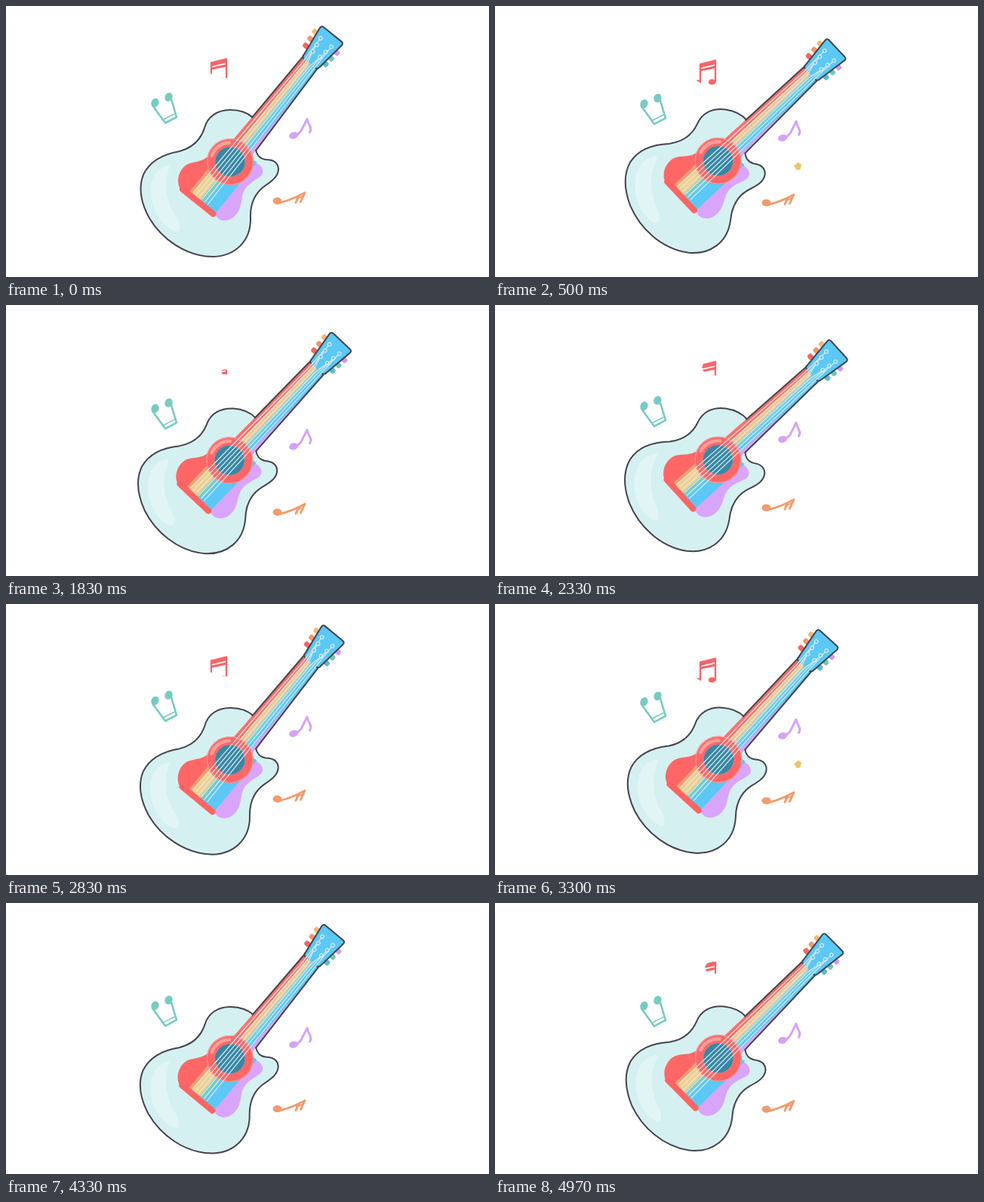
These frames come from a looping animation (640 px wide and 360 px high, 5000 ms). An HTML page:

```html
<!DOCTYPE html>
<html lang="en">
<head>
<meta charset="utf-8">
<title>Guitar and notes</title>
<style>
html, body { margin: 0; width: 100%; height: 100%; overflow: hidden; background: #fff; }
svg { display: block; width: 100vw; height: 100vh; }
.line { fill: none; stroke-linecap: round; stroke-linejoin: round; }
.edge { stroke: #45434d; stroke-width: 2; stroke-linejoin: round; stroke-linecap: round; }
.solid { stroke: none; }
</style>
</head>
<body>
<svg viewBox="0 0 640 360">
  <defs><clipPath id="reveal"><ellipse id="window" cx="290" cy="84"/></clipPath></defs>

  <g id="guitar">
    <path class="edge" fill="#d5f0f1" d="M327 148C318 140 307 138 297 138C280 138 267 147 263 162C258 178 248 188 230 193C207 197 190 207 182 224C175 242 179 262 190 282C206 309 238 333 275 333C303 332 324 313 324 283C323 263 329 249 343 239C355 231 361 225 361 216C360 207 354 204 344 204C336 203 332 197 331 191"/>
    <path fill="#e2f5f5" d="M214 212C194 218 188 240 194 263C201 285 215 298 228 300C233 296 230 285 222 275C212 255 209 235 217 212Z"/>
    <g transform="translate(297 207) rotate(39)">
      <path fill="#d9a5fb" d="M27-20C36-24 46-18 43-9C40 2 36 10 39 20C42 30 52 38 50 53C48 66 36 72 28 66Z"/>
      <path fill="#ff6767" d="M-20-15L-14 66L-28 70C-40 66-47 50-42 38C-37 28-28 24-27 10Z"/>
      <path fill="#f2cf8c" d="M-15 0H1V66H-15Z"/>
      <path fill="#f5a06f" d="M-17 0H-12V66H-17Z"/>
      <path fill="#79cbc4" d="M1 0H8V66H1Z"/>
      <path fill="#5bc8f5" d="M8-20L28-22V67H8Z"/>
      <path class="line" stroke="#ff6464" stroke-width="8" d="M-26 68H26"/>
      <g id="neck"></g>
      <path class="line edge" d="M-13-168L-14.5-64M12-168L17-33"/>
      <circle r="31" fill="#ff6767"/>
      <circle r="30.3" fill="none" stroke="#f79a95" stroke-width="1.2"/>
      <path class="line" stroke="#ff9e9a" stroke-width="4.5" d="M-24 9A25.5 25.5 0 0 1-17-19"/>
      <circle r="20" fill="#3787a5" stroke="#c77c85" stroke-width="1"/>
      <g id="pegs"></g>
      <path class="edge" fill="#5bc8f5" d="M-11-168Q-14-169-13.5-172L-19.5-213Q-20-217-16-217H14Q18-217 17.5-213L13-172Q13-169 10-168"/>
      <g id="strings" class="line" stroke="#dcebed"></g>
    </g>
  </g>

  <g id="teal" class="line" stroke="#78cbc3" stroke-width="2.6">
    <g class="solid" fill="#78cbc3">
      <ellipse cx="197.5" cy="128.5" rx="5" ry="6" transform="rotate(25 197.5 128.5)"/>
      <ellipse cx="215.5" cy="121" rx="5" ry="6" transform="rotate(25 215.5 121)"/>
    </g>
    <path d="M194 132L211 155.5L226 147.5L219 124"/>
    <path stroke-width="1.6" d="M208 151L223 143.5"/>
  </g>

  <g id="purple" class="line" stroke="#d5a2f8" stroke-width="2.9">
    <ellipse class="solid" cx="381" cy="172" rx="6" ry="4.5" fill="#d5a2f8" transform="rotate(-15 381 172)"/>
    <path d="M384 173L391 166L399 150Q400 155 403 160Q405 164 402.5 168"/>
  </g>

  <g id="orange" class="line" stroke="#f29b6c" stroke-width="2.8">
    <ellipse class="solid" cx="359.5" cy="259" rx="6" ry="4.7" fill="#f29b6c"/>
    <path d="M361 262Q380 257 396 248L390.5 260M388 252.5L384 261"/>
    <path stroke-width="1.8" d="M385 256L393 253"/>
  </g>

  <g id="red"><g clip-path="url(#reveal)" class="line" stroke="#f8656a" stroke-width="2.3">
    <g class="solid" fill="#f8656a">
      <ellipse cx="269" cy="106" rx="4.3" ry="3.6"/>
      <ellipse cx="287.5" cy="105" rx="4.5" ry="3.6"/>
      <path d="M271 80.5L293 75V81L271 86.5Z"/>
      <path d="M271 88L293 83V86.5L271 91Z"/>
    </g>
    <path d="M272 82V106M292 77V105"/>
  </g></g>
  <path id="yellow" fill="#edc66b" d="M-6-1L1-6L6-3L4 5L-1 6Z"/>
</svg>
<script>
const LOOP = 5000, FPS = 24, SWING = 1515, BOB = 2800;
const $ = id => document.getElementById(id);

function add(parent, tag, attrs) {
  const el = document.createElementNS("http://www.w3.org/2000/svg", tag);
  for (const k in attrs) el.setAttribute(k, attrs[k]);
  $(parent).append(el);
}

// Neck stripes: colour, then left and right edge as shares of the width
[["#ff7069", 0, .25], ["#f2c58a", .25, .5], ["#7ccdca", .5, .62],
 ["#5bc8f5", .62, 1]].forEach(([fill, a, b]) => {
  const top = f => -12.5 + 24.5 * f, low = f => -15.5 + 32.5 * f;
  add("neck", "path", { fill, d: `M${top(a)}-170H${top(b)}L${low(b)}-25H${low(a)}Z` });
});
add("neck", "path", { fill: "#d9a5fb", d: "M12.5-150L17-25H12Z" });

["#efba78", "#f2966c", "#f2685f"].forEach((fill, i) =>
  add("pegs", "rect", { x: -25 + i, y: -208.5 + i * 11, width: 8, height: 7, rx: 2.5, fill }));
["#d09bf0", "#70c8b8", "#5bb9d6"].forEach((fill, i) =>
  add("pegs", "rect", { x: 14.5 - i, y: -205 + i * 10.5, width: 8, height: 7, rx: 2.5, fill }));

for (let i = 0; i < 6; i++) {
  const s = i - 2.5, side = Math.sign(s), row = Math.abs(s) - .5;
  const x = -1 + side * (6 + row * 1.5), y = -183 - row * 10;
  add("strings", "path", { "stroke-width": 1.2, d: `M${s * 5} 62L${s * 3.4}-163L${x} ${y + 2}` });
  add("strings", "circle", { cx: x, cy: y, r: 2.3, fill: "#5bc8f5", "stroke-width": 1.2 });
}

const ease = p => (1 - Math.cos(Math.PI * p)) / 2;

// Sinks from 0 to 1 until the low point, then rises for the rest of the bob
const sink = (u, low) => u < low ? ease(u / low) : ease((BOB - u) / (BOB - low));

const shift = (id, x, y, size = 1) =>
  $(id).setAttribute("transform", `translate(${x} ${y}) scale(${size})`);

function draw(ms) {
  const last = LOOP * FPS / 1000 - 1;
  const t = Math.min(last, Math.round(ms % LOOP * FPS / 1000)) * 1000 / FPS;
  const u = t % BOB;

  const turn = 4.6 - 4.75 * Math.cos(2 * Math.PI * (t + 55) / SWING);
  $("guitar").setAttribute("transform", `rotate(${turn} 305 196)`);

  shift("teal", 0, 9 * sink(u, 2000));
  shift("purple", 0, 16.5 * sink(u, 1700));
  shift("orange", 0, 16.5 * sink(u, 2000));
  shift("red", 0, 11 * sink(u, 1800) - 6);
  shift("yellow", 401, 213, Math.max(0, Math.sin(Math.PI * u / 1500)));

  // The red note opens slowly from its beam and shuts quickly
  const v = (u + BOB - 1600) % BOB;
  const open = Math.max(0, Math.min(.021 * v, .35 * (2310 - v)));
  $("window").setAttribute("rx", open);
  $("window").setAttribute("ry", open * .7);
}

const start = performance.now();
function tick() {
  draw(performance.now() - start);
  requestAnimationFrame(tick);
}
tick();
</script>
</body>
</html>
```
